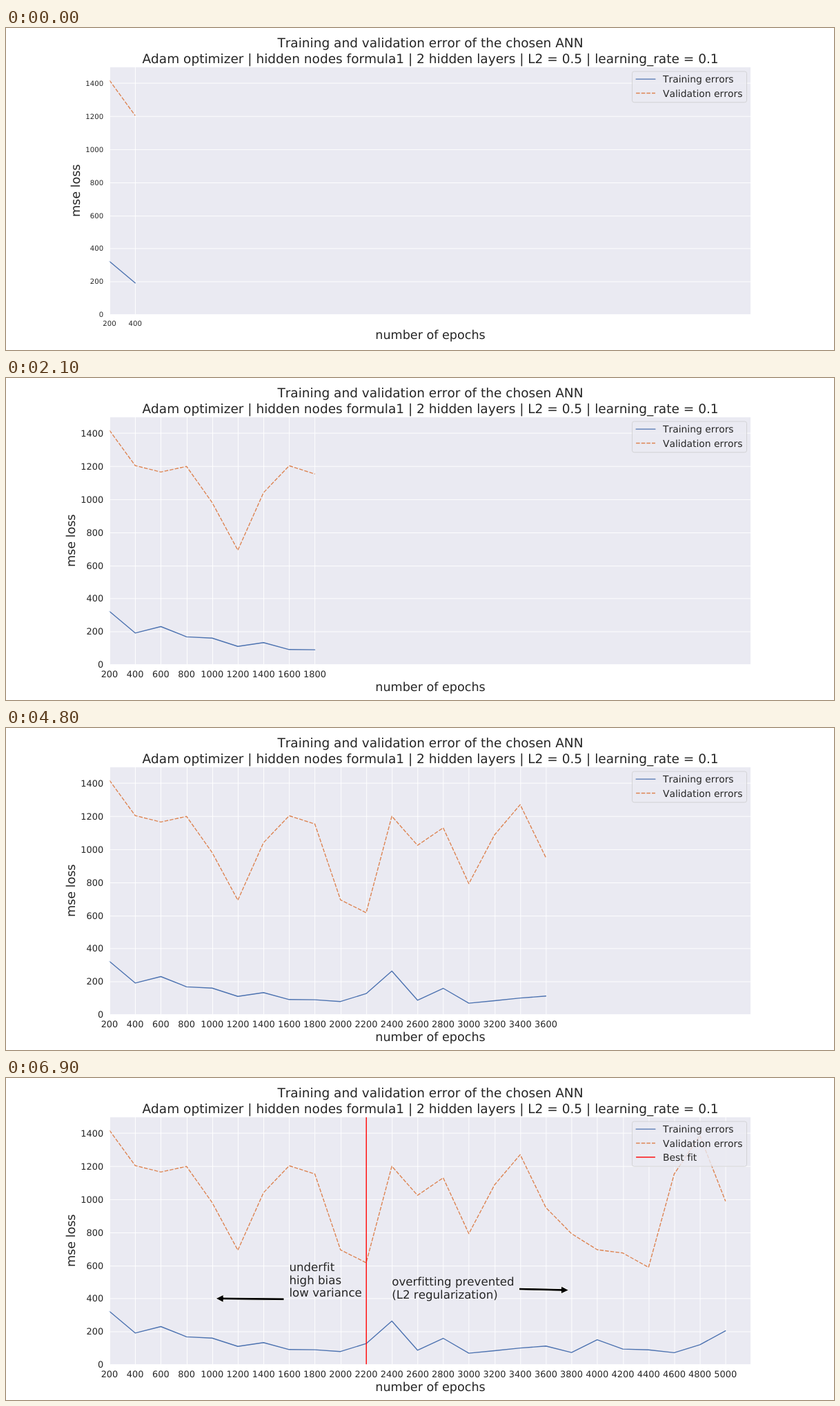
An HTML page that plays this animation: 1200x467 px, repeating every 7.2 s.

```html
<!DOCTYPE html>
<html lang="en">
<head>
<meta charset="utf-8">
<title>Training and validation error</title>
<style>
  html, body { margin: 0; width: 100%; height: 100%; overflow: hidden; background: #fff; }
  svg { display: block; width: 1200px; height: 467px; }
  text {
    font-family: "DejaVu Sans", sans-serif;
    font-kerning: none;
    font-variant-ligatures: none;
    fill: #262626;
    text-rendering: geometricPrecision;
    white-space: pre;
  }
  .mid { text-anchor: middle; }
  .end { text-anchor: end; }
  .title { font-size: 18.52px; }
  .label { font-size: 17.59px; }
  .note { font-size: 16.67px; }
  .key { font-size: 13.89px; }
  .grid { stroke: #fff; stroke-width: .93; fill: none; }
  .frame { stroke: #fff; stroke-width: 1.16; fill: none; }
  .line { fill: none; stroke-width: 1.39; stroke-linejoin: round; }
  .train { stroke: #4c72b0; stroke-linecap: round; }
  .valid { stroke: #dd8452; stroke-dasharray: 5.556 2.083; }
  .best { stroke: #f00; }
  .box { fill: #eaeaf2; stroke: #ccc; stroke-width: .93; opacity: .8; }
  .arrow { fill: #000; stroke: #fff; stroke-width: .93; }
</style>
</head>
<body>
<svg id="chart" viewBox="0 0 1200 467"></svg>
<script>
const STEP_MS = 300, STEPS = 24;
const LEFT = 150, RIGHT = 1080, TOP = 56.04, BOTTOM = 415.63;
const POINT = 1200 / 1296;

const train = [322, 191, 230, 168, 160, 110, 133, 91, 89.5, 79, 127, 263, 87,
  159, 69, 84, 100, 112, 73, 150, 94, 89, 72, 120, 204];
const valid = [1417, 1204, 1165, 1199, 980, 692, 1040, 1203, 1153, 694, 616, 1200, 1024,
  1130, 792, 1087, 1270, 950, 792, 695, 675, 588, 1153, 1385, 988];

const px = i => LEFT + i * (RIGHT - LEFT) / 25;
const py = v => BOTTOM - v * (BOTTOM - TOP) / 1500;

// Straight rules sit on whole points, thin ones on half points
const snap = (v, shift = 0) => (Math.round(v / POINT) + shift) * POINT;

const text = (x, y, cls, str, extra = '') =>
  `<text x="${x}" y="${y}" class="${cls}" ${extra}>${str}</text>`;
const path = (d, cls) => `<path d="${d}" class="${cls}"/>`;
const curve = (data, count, cls) =>
  path('M' + data.slice(0, count).map((v, i) => `${px(i).toFixed(2)} ${py(v).toFixed(2)}`).join('L'),
    'line ' + cls);

const area = `M${snap(LEFT)} ${snap(TOP)}H${snap(RIGHT)}V${snap(BOTTOM)}H${snap(LEFT)}Z`;

// Arrow along +x from its tail, turned towards the tip
function arrow(x0, y0, x1, y1) {
  const len = Math.hypot(x1 - x0, y1 - y0);
  const turn = Math.atan2(y1 - y0, x1 - x0) * 180 / Math.PI;
  const neck = len - 11.1;
  return `<path class="arrow" transform="translate(${x0} ${y0}) rotate(${turn})"
    d="M0 -1.85H${neck}V-5.56L${len} 0L${neck} 5.56V1.85H0Z"/>`;
}

function axes(count, small) {
  const size = small ? 10.19 : 12.96;
  const font = `font-size="${size}"`;
  let out = `<path d="${area}" fill="#eaeaf2"/>`;
  for (let i = 0; i < count; i++) {
    out += path(`M${snap(px(i), .5)} ${TOP}V${BOTTOM}`, 'grid');
    out += text(px(i), 424.4 + size * .76, 'mid', 200 + 200 * i, font);
  }
  for (let v = 0; v <= 1400; v += 200) {
    out += path(`M${LEFT} ${snap(py(v), .5)}H${RIGHT}`, 'grid');
    out += text(141.2, py(v) + size * .3645, 'end', v, font);
  }
  out += text(615, small ? 451.2 : 454, 'label mid', 'number of epochs');
  out += text(0, 0, 'label mid', 'mse loss',
    `transform="translate(${small ? 107 : 100.1} 235.8) rotate(-90)"`);
  out += text(615, 28.3, 'title mid', 'Training and validation error of the chosen ANN');
  out += text(615, 50.5, 'title mid',
    'Adam optimizer | hidden nodes formula1 | 2 hidden layers | L2 = 0.5 | learning_rate = 0.1');
  return out;
}

function legend(rows) {
  let out = `<rect x="907.5" y="63" width="166" height="${4 + rows.length * 20.4}" rx="2.78" class="box"/>`;
  rows.forEach(([cls, name], i) => {
    const y = 74.2 + i * 20.4;
    out += path(`M913.1 ${snap(y)}h27.8`, 'line ' + cls) + text(952, y + 4.9, 'key', name);
  });
  return out;
}

function notes() {
  return text(410.4, 279.8, 'note', 'underfit') +
    text(410.4, 298.5, 'note', 'high bias') +
    text(410.4, 317.2, 'note', 'low variance') +
    text(559.2, 301, 'note', 'overfitting prevented') +
    text(559.2, 319.7, 'note', '(L2 regularization)') +
    arrow(403, 320.8, 304, 319.8) +
    arrow(743.5, 306, 815.6, 307.7);
}

const chart = document.getElementById('chart');

function draw(step) {
  const count = step + 2, last = step === STEPS - 1;
  const rows = [['train', 'Training errors'], ['valid', 'Validation errors']];
  let out = axes(count, step === 0) + curve(train, count, 'train') + curve(valid, count, 'valid');
  if (last) {
    rows.push(['best', 'Best fit']);
    out += path(`M${snap(px(10))} ${TOP}V${BOTTOM}`, 'line best');
  }
  out += path(area, 'frame');
  if (last) out += notes();
  chart.innerHTML = out + legend(rows);
}

let shown = 0;
const start = performance.now();
draw(0);

function tick() {
  const step = Math.floor(Math.max(0, performance.now() - start) / STEP_MS) % STEPS;
  if (step !== shown) draw(shown = step);
  requestAnimationFrame(tick);
}
requestAnimationFrame(tick);
</script>
</body>
</html>
```
